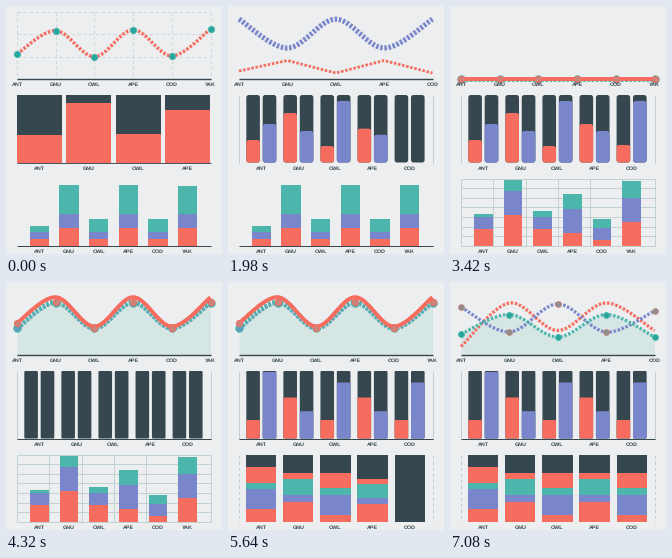
Write a matplotlib script that moves like this. It is 216 px wide and 248 px high and loops after 7380 ms.

```python
import numpy as np
import matplotlib.pyplot as plt
from matplotlib.animation import FuncAnimation
from matplotlib.patches import FancyBboxPatch, Rectangle

plt.rcParams["text.hinting"] = "none"

W, H, DPI = 216, 248, 64
PT = 72 / DPI
STEP, FRAMES = 60, 123
ITEM = 154  # ms each item takes to rise

BG, DARK, GRID = "#eceeef", "#37474f", "#c9d3d8"
RED, TEAL, INDIGO = "#f66c5f", "#4db6ac", "#7986cb"
MARK, MUTED = "#26a69a", "#86908f"
NAMES = ["ANT", "GNU", "OWL", "APE", "COD", "YAK"]
LEFT, RIGHT = 11, 204.5
LINE_Y, MID_Y, LOW_Y = 73, 156.5, 240
PLOT_H = 67.5
DASH = (2.5, 1.7)

fig = plt.figure(figsize=(W / DPI, H / DPI), dpi=DPI, facecolor=BG)
ax = fig.add_axes([0, 0, 1, 1])


def rise(t, start, n):
    p = np.clip((t - start) / ITEM - np.arange(n), 0, 1)
    return 1 - (1 - p) ** 3


def zigzag(n, even, odd, first=None, drift=0):
    """Values alternating between two levels, with an optional first value."""
    i = np.arange(n)
    vals = np.where(i % 2, odd, even) + drift * i
    if first is not None:
        vals = np.where(i == 0, first, vals)
    return vals


def centers(n):
    return np.linspace(33.3, 181.6, n)


def stroke(xs, ys, color, width, dash=None, z=3):
    style = (0, (dash[0] / width, dash[1] / width)) if dash else "-"
    ax.plot(xs, ys, color=color, lw=width * PT, ls=style, zorder=z,
            solid_capstyle="butt", dash_capstyle="butt")


def hline(y, color=DARK, width=1.0, dash=None, z=2):
    stroke([LEFT, RIGHT], [y, y], color, width, dash, z)


def vline(x, base, color=GRID, dash=None):
    stroke([x, x], [base - PLOT_H, base], color, 0.8, dash, 1)


def sides(base, dash=None):
    for x in (LEFT, RIGHT):
        vline(x, base, "#b9c4c9", dash)


def labels(xs, y):
    for x, name in zip(xs, NAMES):
        ax.text(x, y, name, color=DARK, fontsize=5.4 * PT, family="Liberation Sans",
                weight="bold", ha="center", va="center_baseline", zorder=7)


# ---- line charts ----

def smooth(xs, ys):
    """Catmull-Rom curve through the points, end points doubled."""
    pts = np.column_stack([xs, ys])
    pad = np.vstack([pts[:1], pts, pts[-1:]])
    u = np.linspace(0, 1, 24)[:, None]
    parts = []
    for a, b, c, d in zip(pad, pad[1:], pad[2:], pad[3:]):
        parts.append(b + (c - a) / 2 * u + (a - 2.5 * b + 2 * c - d / 2) * u ** 2
                     + (1.5 * (b - c) + (d - a) / 2) * u ** 3)
    return np.vstack(parts).T


def place(ys, p):
    return np.linspace(LEFT, RIGHT, len(ys)), LINE_Y + (np.array(ys) - LINE_Y) * p


def series(ys, p, color, width, dash=None, fill=False, curve=True, z=4):
    xs, ys = place(ys, p)
    if curve:
        xs, ys = smooth(xs, ys)
    if fill:
        ax.fill_between(xs, ys, LINE_Y, color=TEAL, alpha=0.14, lw=0, zorder=1)
    stroke(xs, ys, color, width, dash, z)


def dots(ys, p, color, edge, size=6.2, z=5):
    ax.plot(*place(ys, p), "o", ms=size * PT, mfc=color, mec=edge, mew=PT, zorder=z)


def line_frame(n):
    hline(LINE_Y, width=1.4)
    labels(np.linspace(LEFT, RIGHT, n), 78.2)


def line_single(t):
    for y in (6, 28, 50.5):
        hline(y, GRID, 0.8, (3.5, 2.5), 1)
    for x in np.linspace(LEFT, RIGHT, 6):
        vline(x, LINE_Y, dash=(3.5, 2.5))
    ys = zigzag(6, 51.5, 25, first=48, drift=-0.4)
    series(ys, 1, RED, 3.4, DASH)
    dots(ys, 1, MARK, TEAL)
    line_frame(6)


def line_pair(t):
    p = rise(t, 660, 5)
    series(zigzag(5, 13.2, 42), p, INDIGO, 5.2, DASH)
    series(zigzag(5, 67, 54.5, first=65), p, RED, 2.8, DASH, curve=False)
    line_frame(5)


def line_area(t):
    p = rise(t, 3420, 6)
    series(zigzag(6, 47, 21), p, INDIGO, 3.4, DASH, z=3)
    series(zigzag(6, 46, 20), p, TEAL, 5, DASH, fill=True)
    dots(zigzag(6, 46, 20.5), p, "#5c9fc0", TEAL, 7.4)
    series(zigzag(6, 44.5, 15.2, first=41), p, RED, 4, z=6)
    dots(zigzag(6, 45.5, 20, first=40.5), p, "#c9857c", RED, z=6)
    line_frame(6)


def line_triple(t):
    p = rise(t, 6300, 5)
    cool, blue = zigzag(5, 55, 32.5, first=52), [25, 50, 22, 50, 29]
    series(zigzag(5, 48.5, 21, first=64.5), p, RED, 3.2, DASH)
    dots(blue, p, MUTED, "#c08079", 5.6)
    series(blue, p, INDIGO, 3.2, DASH)
    dots(cool, p, MARK, TEAL, 5.8)
    series(cool, p, TEAL, 3.2, DASH, fill=True)
    line_frame(5)


# ---- bar charts ----

def box(x, top, bottom, w, color, r=0):
    h = bottom - top
    if h < 0.05:
        return
    style = dict(fc=color, lw=0, zorder=3)
    if r:
        round_style = f"round,pad=0,rounding_size={min(r, h / 2)}"
        ax.add_patch(FancyBboxPatch((x, top), w, h, boxstyle=round_style, **style))
    else:
        ax.add_patch(Rectangle((x, top), w, h, **style))


def stack(x, base, w, heights, colors, back=False, r=0):
    """Bar standing on base, centred on x, built from segments."""
    if back:
        box(x - w / 2, base - PLOT_H, base, w, DARK, r)
    for h, color in zip(heights, colors):
        box(x - w / 2, base - h, base, w, color, r)
        base -= h


def mid_single(t):
    for x, h in zip(centers(4), [27.5, 59.5, 28.5, 52.5]):
        stack(x, MID_Y, 44.8, [h], [RED], back=True)
    hline(MID_Y, width=0.9)
    labels(centers(4), 162)


def mid_groups(t, start, reds, blues, r):
    for x, red, blue, k in zip(centers(5), reds, blues, rise(t, start, 5)):
        stack(x - 8.2, MID_Y, 13.6, [red * k], [RED], True, r)
        stack(x + 8.2, MID_Y, 13.6, [blue * k], [INDIGO], True, r)
    sides(MID_Y)
    labels(centers(5), 162)


def mid_round(t):
    mid_groups(t, 1440, [22.5, 49.5, 16.5, 38.5, 17.5], zigzag(5, 61.5, 31.5, first=38.5), 2.6)


def mid_plain(t):
    mid_groups(t, 4320, zigzag(5, 18.5, 41), zigzag(5, 56, 27.3, first=66.5), 1.2)
    hline(MID_Y, z=4)


def low_stacks(t, start, parts, w, back=False):
    n = len(parts[0])
    for x, heights, k in zip(centers(n), np.transpose(parts), rise(t, start, n)):
        stack(x, LOW_Y, w, heights * k, (RED, INDIGO, TEAL, RED), back)
    labels(centers(n), 245)


def low_tall(t):
    parts = [zigzag(6, 7.3, 17.7), zigzag(6, 6.3, 14.7), zigzag(6, 13, 28.3, first=6.5)]
    low_stacks(t, -900, parts, 19.4)
    hline(LOW_Y)


def low_grid(t):
    for y in np.linspace(LOW_Y - PLOT_H, LOW_Y, 8):
        hline(y, "#b7cccd", 0.8, z=1)
    for x in np.linspace(LEFT, RIGHT, 7):
        vline(x, LOW_Y, "#b7cccd")
    parts = [[17, 31, 17, 13.5, 6, 24.5], zigzag(6, 12, 23.7), zigzag(6, 3.5, 10.5, drift=1.3)]
    low_stacks(t, 2400, parts, 18.8)


def low_full(t):
    sides(LOW_Y, (3.5, 2.5))
    parts = [zigzag(5, 7.5, 20, first=13), zigzag(5, 20, 7.5),
             zigzag(5, 6.3, 16), zigzag(5, 15.5, 5.2)]
    low_stacks(t, 5100, parts, 30.2, back=True)


ROWS = [
    [(0, line_single), (660, line_pair), (3420, line_area), (6300, line_triple)],
    [(0, mid_single), (1440, mid_round), (4320, mid_plain)],
    [(0, low_tall), (2400, low_grid), (5100, low_full)],
]


def draw(frame):
    t = frame * STEP
    ax.clear()
    ax.set_xlim(0, W)
    ax.set_ylim(H, 0)
    ax.axis("off")
    for row in ROWS:
        chart = [c for start, c in row if start <= t][-1]
        chart(t)
    return []


anim = FuncAnimation(fig, draw, frames=FRAMES, interval=STEP, init_func=lambda: draw(0),
                     repeat=True, repeat_delay=0, blit=False)
plt.show()
```
